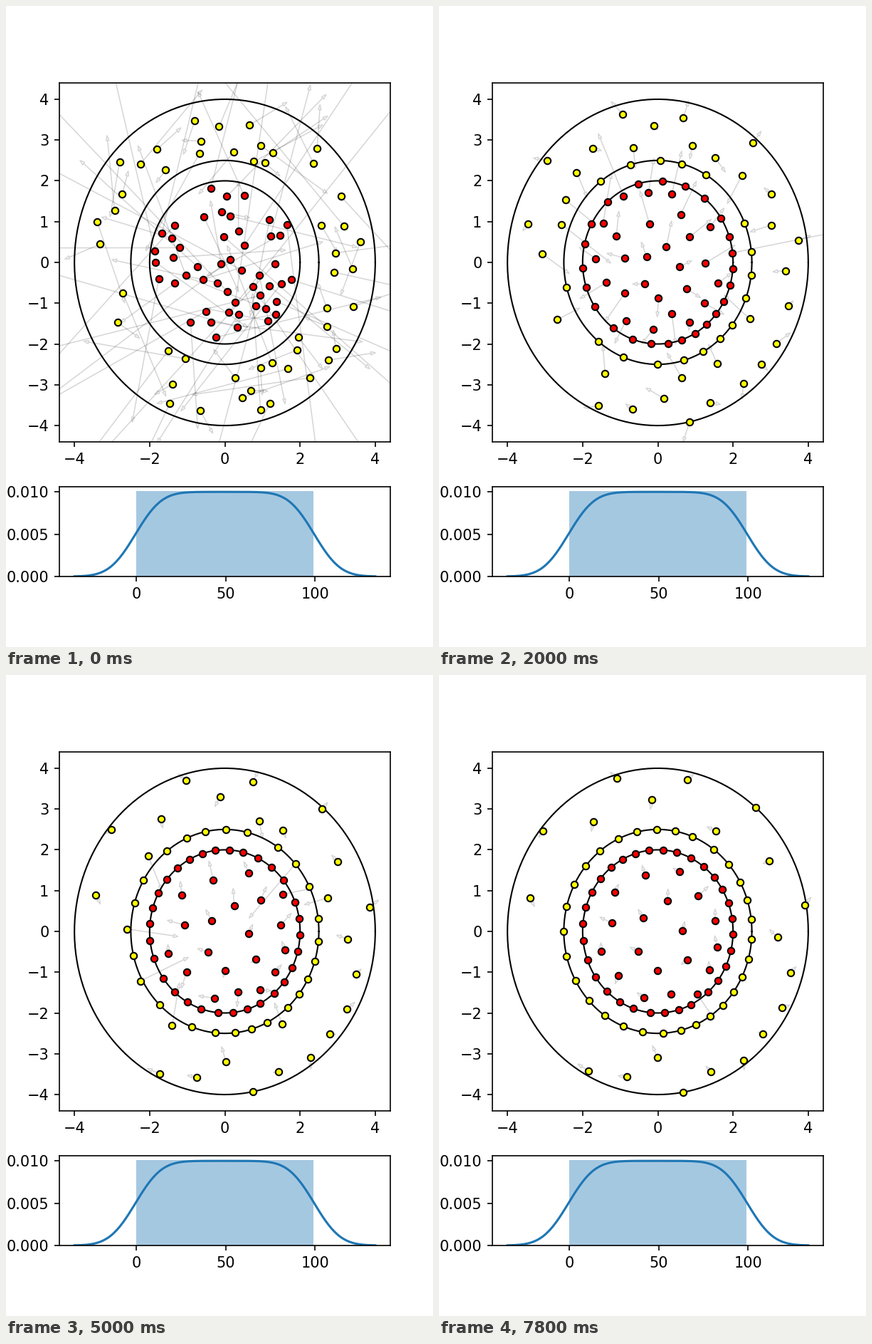
Recreate the animation shown at these times as a matplotlib script. Size 600 px wide and 900 px high, loop 8 s.

```python
import numpy as np
import matplotlib.pyplot as plt
from matplotlib.animation import FuncAnimation
from matplotlib.collections import LineCollection

FRAMES, INTERVAL = 40, 200
N = 50                       # charges of each sign
R_CORE, R_IN, R_OUT = 2.0, 2.5, 4.0
STEP, MAX_MOVE = 0.006, 0.15
ARROW, HEAD_W, HEAD_L = 0.15, 0.04, 0.12

rng = np.random.default_rng(12)
charge = np.repeat([1, -1], N)
r_min = np.where(charge > 0, 0.0, R_IN)
r_max = np.where(charge > 0, R_CORE, R_OUT)


def scatter(lo, hi, gap):
    """N random points in a ring, no two closer than gap."""
    pts = []
    while len(pts) < N:
        r = np.sqrt(rng.uniform(lo**2, hi**2))
        p = r * np.exp(1j * rng.uniform(0, 2 * np.pi))
        if all(abs(p - q) > gap for q in pts):
            pts.append(p)
    return np.array(pts)


def place(gap):
    return np.r_[scatter(0, R_CORE - 0.06, gap),
                 scatter(R_IN + 0.08, R_OUT - 0.25, gap)]


def force(z):
    """Coulomb force on every charge."""
    d = z[:, None] - z
    r = np.abs(d)
    np.fill_diagonal(r, 1)
    return (charge[:, None] * charge * d / r**3).sum(axis=1)


def keep_inside(z):
    r = np.abs(z)
    return z / r * np.clip(r, r_min, r_max)


def on_wall(z):
    r = np.abs(z)
    return (r > r_max - 1e-6) | (r < r_min + 1e-6)


def arrow_lines(start, vec):
    size = np.abs(vec)
    seen = size > 0.01
    z, vec, u = start[seen], vec[seen], vec[seen] / size[seen]
    base = z + vec
    side = 1j * u * HEAD_W
    line = np.stack([z, base, base + side, base + u * HEAD_L,
                     base - side, base], axis=1)
    return np.stack([line.real, line.imag], axis=-1)


def simulate():
    z = place(gap=0.24)
    push = force(place(gap=0.04))    # crowded draw: violent first arrows
    states, arrows = [], []
    for _ in range(FRAMES):
        states.append(z)
        arrows.append(arrow_lines(z, ARROW * push))
        f = force(z)
        push = np.where(on_wall(z), 0, f)
        size = np.maximum(np.abs(f), 1e-9)
        z = keep_inside(z + f / size * np.minimum(STEP * size, MAX_MOVE))
    return states, arrows


states, arrows = simulate()

fig = plt.figure(figsize=(4, 6), dpi=150)
ax = fig.add_axes([0.125, 0.32, 0.775, 0.56])
ax.set(xlim=(-4.4, 4.4), ylim=(-4.4, 4.4),
       xticks=range(-4, 5, 2), yticks=range(-4, 5))
turn = np.linspace(0, 2 * np.pi, 300)
for radius in (R_CORE, R_IN, R_OUT):
    ax.plot(radius * np.cos(turn), radius * np.sin(turn), "k", lw=1, zorder=2)

shafts = LineCollection([], colors=[(0, 0, 0, 0.16)], linewidths=0.75, zorder=1)
ax.add_collection(shafts)


def dots(color):
    return ax.plot([], [], "o", ms=4.5, mfc=color, mec="k", mew=1, zorder=3)[0]


red_dots, yellow_dots = dots("red"), dots("yellow")

# histogram and smoothed density of the charge indices
ids = np.arange(2 * N)
span = ids[-1]
width = ids.std(ddof=1) * len(ids) ** -0.2
grid = np.linspace(-3 * width, span + 3 * width, 200)
bell = np.exp(-0.5 * ((grid[:, None] - ids) / width) ** 2)
density = bell.sum(axis=1) / (len(ids) * width * np.sqrt(2 * np.pi))

low = fig.add_axes([0.125, 0.11, 0.775, 0.14])
low.bar(0, 1 / span, width=span, align="edge", color="C0", alpha=0.4)
low.plot(grid, density, color="C0", lw=1.5)
margin = 0.05 * (grid[-1] - grid[0])
low.set(xlim=(grid[0] - margin, grid[-1] + margin), ylim=(0, 1.05 / span),
        xticks=[0, 50, 100], yticks=[0, 0.005, 0.01])


def draw(i):
    z = states[i]
    red_dots.set_data(z[:N].real, z[:N].imag)
    yellow_dots.set_data(z[N:].real, z[N:].imag)
    shafts.set_segments(arrows[i])
    return shafts, red_dots, yellow_dots


anim = FuncAnimation(fig, draw, frames=FRAMES, interval=INTERVAL,
                     repeat=True, repeat_delay=0, blit=False)
plt.show()
```
